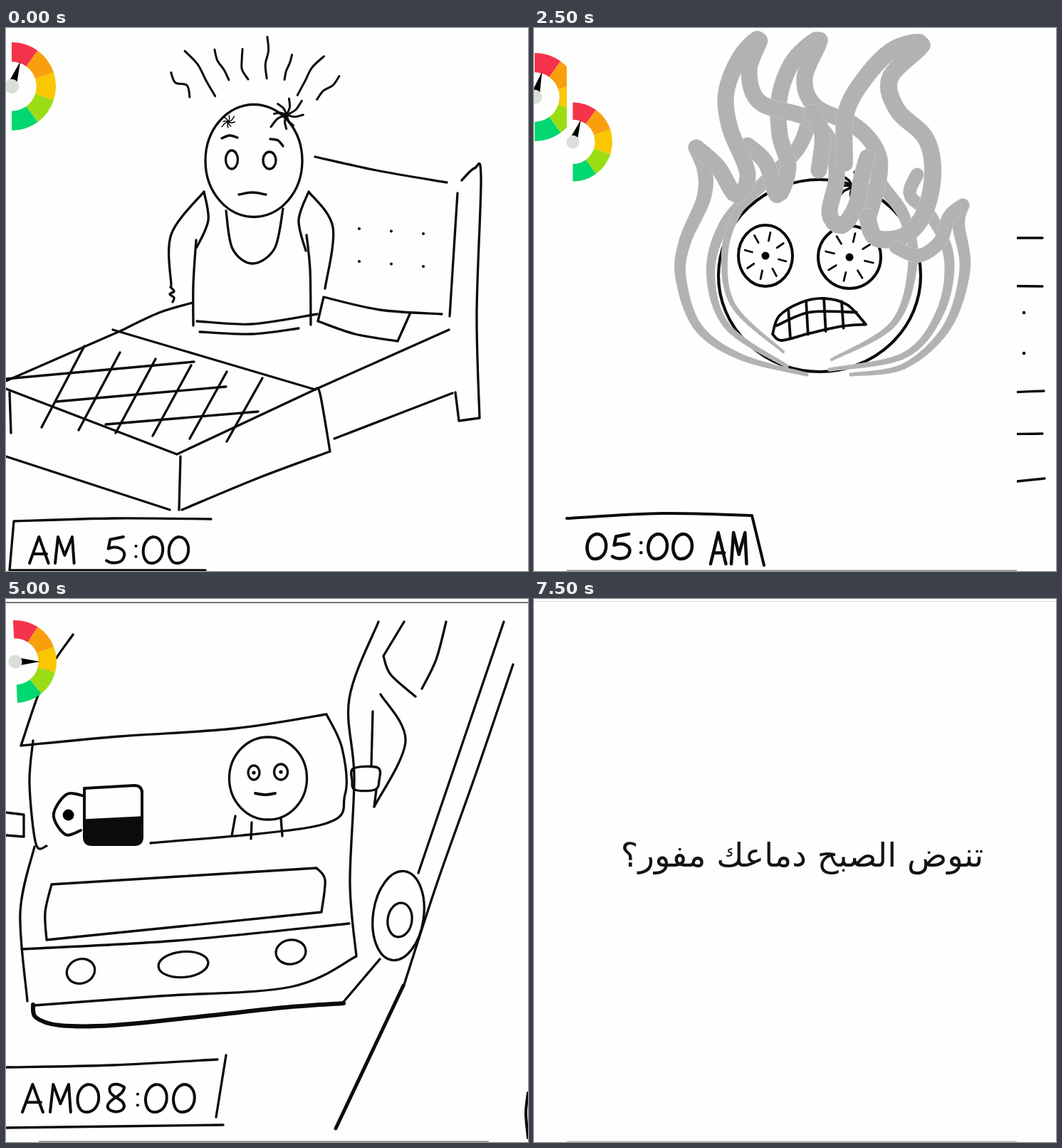
An HTML page that plays this animation: 733x763 px, repeating every 8 s.

```html
<!DOCTYPE html>
<html lang="ar">
<meta charset="utf-8">
<style>
html, body { margin: 0; height: 100%; overflow: hidden; background: #fdfefd; }
svg { display: block; }
.ink { fill: none; stroke: #0b0b0b; stroke-linecap: round; stroke-linejoin: round; }
text { font: 46.5px "DejaVu Sans", sans-serif; fill: #131318; direction: rtl; text-anchor: middle; }
</style>
<svg id="stage" width="733" height="763"></svg>
<script>
const BLACK = '#0b0b0b', PAPER = '#fdfefd';
const repeat = (n, draw) => Array.from({ length: n }, (_, i) => draw(i)).join('');
const random = seed => Math.abs(Math.sin(seed * 12.9898) * 43758.5453) % 1;
const polar = (x, y, rx, ry, degrees) => {
  const a = degrees * Math.PI / 180;
  return [x + rx * Math.cos(a), y + ry * Math.sin(a)];
};

// Smooth path through key points "x y x y ..."; equal ends make a closed loop
function curve(keys) {
  const n = keys.trim().split(/\s+/).map(Number);
  const p = n.filter((_, i) => i % 2 === 0).map((x, i) => [x, n[2 * i + 1]]);
  const last = p.length - 1;
  const closed = last > 1 && String(p[0]) === String(p[last]);
  const before = closed ? p[last - 1] : p[0], after = closed ? p[1] : p[last];
  return 'M' + p[0] + p.slice(1).map((end, i) => {
    const start = p[i], prev = p[i - 1] || before, next = p[i + 2] || after;
    const c1 = start.map((v, k) => v + (end[k] - prev[k]) / 6);
    const c2 = end.map((v, k) => v - (next[k] - start[k]) / 6);
    return `C${c1} ${c2} ${end}`;
  }).join('');
}
const line = (d, w = 3.3, color = BLACK) =>
  `<path class="ink" d="${d}" style="stroke:${color};stroke-width:${w}"/>`;
const ink = (strokes, w) => line(strokes.split('/').map(curve).join(''), w);
const solid = (d, color = BLACK) => `<path d="${d}" fill="${color}"/>`;
const dot = (x, y, r) => `<circle cx="${x}" cy="${y}" r="${r}"/>`;
const oval = (x, y, rx, ry, w = 3.3, turn = 0) =>
  `<ellipse class="ink" cx="${x}" cy="${y}" rx="${rx}" ry="${ry}" stroke-width="${w}" transform="rotate(${turn} ${x} ${y})"/>`;
const rule = (y, w, color, x0 = 0, x1 = 733) => solid(`M${x0} ${y - w / 2}H${x1}v${w}H${x0}z`, color);
const floorRule = rule(762.3, 1.4, '#8c8c8c', 46, 678);

// Half-dial mood meter: centre, radius, needle angle, tilt
const gauge = (x, y, r, needle, tilt = 0) =>
  `<g transform="translate(${x} ${y}) scale(${r / 100})">` +
  ['#f5334a', '#f99f0e', '#f9c700', '#9add14', '#00d771'].map((color, i) =>
    `<circle r="78" fill="none" stroke="${color}" stroke-width="44" pathLength="10" stroke-dasharray="1 9"
      transform="rotate(${tilt - 90 + 36 * i})"/>`).join('') +
  `<path d="M10-9 60 0 10 9z" transform="rotate(${needle})"/><circle r="16.5" fill="#dcdedb"/></g>`;

// Handwritten letters on a 10 x 10 grid
const glyphs = {
  A: 'M0 10L5 0 10 10M2 6.5H9', M: 'M0 10L1.5 0 5 7 9 0 10 10', P: 'M2 10L1 0C8-1 12 4 2 5.5',
  0: 'M5 0C-2 1-1.5 10 4 10C12 10 12 0 5 0', 1: 'M0 2.5L5 0 6 10',
  3: 'M1 1C6-1 11 2 8 4Q6 5 3 5C12 4 11 10 6 10Q3 10 1 9',
  5: 'M9 0L2 1 1 4.5C6 3 11 5 9 8 8 10 3 10.5 0 9',
  6: 'M10 0C3 0 0 4 0 7C0 11 7 10 9 8C10 5 6 4 2 7',
  8: 'M9 1C5-1 1 0 2 2.5C3 5 9 5 9 8C8 11 0 10 1 7.5C2 5 9 4 9 1',
  ':': 'M2 3.5h.1M2 7.5h.1', '–': 'M0 6H10', ' ': '',
};
const write = (text, x, y, step, h, pen = 4) => [...text].map(c => {
  const letter = `<path class="ink" d="${glyphs[c]}" vector-effect="non-scaling-stroke" stroke-width="${pen}"
    transform="translate(${x} ${y}) scale(${step * .074} ${h / 10})"/>`;
  x += ':–'.includes(c) ? step * .45 : step;
  return letter;
}).join('');

const eye = (x, y, rx, ry, pupil, w, veins = 0) =>
  oval(x, y, rx, ry, w) + dot(x, y, pupil) +
  repeat(veins, i => {
    const at = k => polar(x, y, rx * k, ry * k, 360 / veins * (i + .3));
    return line(`M${at(.5)}L${at(.78)}`, w * .7);
  });
const gridDots = (x, y, dx, slope, dy, r) =>
  repeat(6, i => dot(x + i % 3 * dx, y + i % 3 * slope + (i > 2 ? dy : 0), r));

// Wavy hairs rising from a head
const strands = (x, y, from, to, n, inner, outer, w) => repeat(n, i => {
  const a = from + (to - from) * i / (n - 1);
  const start = inner + 25 * random(i + 1), end = outer - 35 * random(i + 40);
  const keys = [0, 1, 2, 3].map(k => {
    const r = start + (end - start) * k / 3;
    return polar(x, y, r, r, a + 4 * (random(i * 4 + k) - .5)).join(' ');
  });
  return ink(keys.join(' '), w);
});
const burst = (x, y, r, rays, w) => repeat(rays, i => {
  const a = 360 / rays * (i + .3 * random(i)), reach = r * (.7 + .5 * random(i + 9));
  return ink([[x, y], polar(x, y, reach / 2, reach / 2, a + 14), polar(x, y, reach, reach, a)].join(' ').replaceAll(',', ' '), w);
});

// Bared teeth in a w x h box
function teeth(x, y, w, h, pen) {
  const at = (u, v) => `${x + u * w} ${y + v * h} `;
  return ink(at(0, .85) + at(.07, .42) + at(.3, .1) + at(.55, 0) + at(.8, .15) + at(1, .62) + '/' +
    at(1, .62) + at(.75, .66) + at(.4, .83) + at(.1, 1) + at(0, .85) + '/' +
    at(.04, .65) + at(.4, .33) + at(.9, .33), pen) +
    repeat(4, i => {
      const u = .17 + .19 * i;
      return ink(at(u, 1.9 * (u - .55) ** 2) + at(u + .02, 1 - .4 * u), pen);
    });
}

// Cup with a round handle; level is the empty share, null shows it from above
function mug(x, y, w, h, level, pen) {
  const r = h * .13;
  const base = `V${y + h - r}Q${x + w} ${y + h} ${x + w - r} ${y + h}H${x + r}Q${x} ${y + h} ${x} ${y + h - r}`;
  const handle = [[0, .18], [-.3, .15], [-.52, .5], [-.32, .83], [-.06, .76]]
    .map(([u, v]) => `${x + u * h} ${y + v * h}`).join(' ');
  const inside = level === null
    ? oval(x + w / 2, y, w / 2, 10, pen, -2) + ink(`${x + 25} ${y + 3} ${x + 90} ${y}`, 13)
    : line(`M${x} ${y + 4}L${x + w - r} ${y}Q${x + w} ${y} ${x + w} ${y + r}`, pen) +
      solid(`M${x} ${y + h * level + 4}L${x + w} ${y + h * level}${base}z`);
  return ink(handle, pen) + dot(x - h * .27, y + h * .5, h * .095) +
    line(`M${x + w} ${y + 8}${base}V${y + 4}`, pen) + inside;
}

// Grey stroke with a pale edge whose width runs from w0 to w1
function brush(keys, w0, w1 = w0) {
  const probe = document.createElementNS('http://www.w3.org/2000/svg', 'path');
  probe.setAttribute('d', curve(keys));
  const length = probe.getTotalLength(), n = Math.ceil(length / 7);
  const at = i => { const p = probe.getPointAtLength(length * i / n); return `${p.x} ${p.y}`; };
  const layer = (extra, color) => repeat(n, i =>
    line(`M${at(i)}L${at(i + 1)}`, w0 + (w1 - w0) * i / n + extra, color));
  return layer(1.2, '#c6c8c6') + layer(0, '#b1b3b1');
}

const wakingUp =
  gauge(8, 82, 62, -71) +
  oval(348, 186.5, 68, 79) + oval(317, 185, 8.5, 13) + oval(370, 186, 9, 12) +
  ink('303 155 314 151 325 154 / 371 156 382 158 389 166 / 327 234 346 231 365 234') +
  ink('309 257 318 310 346 331 377 310 389 254') +
  ink('232 362 232 290 278 230 / 278 230 284 270 268 308 / 267 298 263 360 263 418 / 231 364 236 370 230 374 236 379 234 385') +
  ink('448 366 459 280 425 230 / 425 230 411 270 421 313 / 422 291 427 340 428 417') +
  ink('268 412 345 416 437 402 / 272 427 345 430 411 422') +
  ink('262 386 215 400 160 426 / 160 426 0 496 / 150 424 434 508 / 434 508 622 424') +
  ink('446 378 438 412 / 438 412 490 430 550 440 / 550 440 567 402 / 446 378 525 396 612 402') +
  ink('434 181 520 200 619 217 / 640 214 658 197 667 210 661 400 665 548 / 665 548 636 552 / 636 552 631 512 / 634 232 623 405 / 627 513 461 577') +
  ink('434 508 441 514 455 595 / 455 595 355 632 247 677 / 230 677 0 602 / 0 507 240 599 / 240 599 434 508 / 245 602 243 677 / 5 512 7 569') +
  repeat(6, i => ink(`${110 + 50 * i} ${447 + 9 * i} ${50 + 52 * i} ${561 + 4 * i}`)) +
  repeat(3, i => ink(`${70 * i} ${493 + 32 * i} ${264 + 45 * i} ${469 + 35 * i}`)) +
  gridDots(496, 282, 45, 3.5, 46, 2) +
  strands(350, 186, -134, -46, 8, 105, 185, 3) +
  burst(394, 122, 25, 8, 3) + burst(312, 132, 10, 8, 1.5) +
  ink('288 690 150 689 11 693 / 11 693 5 762 / 5 762 280 762') +
  write('AM 5:00', 33, 715, 36, 37);

const tense =
  gauge(1, 97, 62, -74) +
  oval(314, 246, 88, 104) + eye(278, 242, 16, 26.5, 4.5, 3, 7) + eye(342, 237, 16, 30, 4.5, 3, 7) +
  teeth(285, 288, 69, 32, 2) +
  ink('276 340 275 420 315 470 360 425 365 334') +
  ink('273 380 240 402 198 410 188 470 194 555 210 577 / 254 396 251 460 234 504 / 228 462 225 604') +
  ink('369 378 395 389 437 390 460 410 461 535 443 548 429 525 417 452 / 391 390 396 465 420 499 / 420 480 421 540 418 592') +
  ink('118 677 212 603 / 212 603 390 591 560 574 714 570 / 240 677 480 657 717 633') +
  ink('455 400 461 372 464 275 482 236 498 275 507 402') +
  ink('516 295 714 295 / 714 363 516 361 / 516 361 514 450 519 521 / 519 521 600 515 716 510') +
  gridDots(564, 399, 62, .5, 57, 2.3) +
  strands(314, 246, -150, -42, 22, 145, 248, 2.6) +
  burst(353, 167, 40, 7, 3.6);

const burning = tense +
  solid('M46 0H678V763H46z', PAPER) +
  gauge(54.5, 160, 55.5, -70) +
  oval(401, 348, 142, 135, 4.2) + eye(325, 320, 38, 43, 5.5, 4, 8) + eye(443, 322, 44, 44, 5.5, 4, 8) +
  teeth(335, 380, 131, 59, 3.8) + burst(447, 224, 24, 8, 3.5) +
  brush('228 168 240 200 238 240 212 300 206 350 230 420 290 462 383 487', 22, 4) +
  brush('390 118 370 170 320 220 268 275 248 345 272 420 355 475', 22, 4) +
  brush('325 215 288 255 268 315 280 390 350 455', 12, 3) +
  brush('538 206 528 235 558 265 583 325 570 400 520 460 415 480', 18, 4) +
  brush('602 249 596 275 605 340 580 420 520 475 445 487', 18, 4) +
  brush('468 182 488 220 520 265 532 330 505 415 418 466', 20, 3) +
  brush('300 165 326 190 342 235 357 195 345 150 345 95 365 45 401 16 380 70 395 110 450 137 480 170 485 205 470 265', 22) +
  brush('228 168 258 195 284 235 300 205 275 140 270 90 290 40 317 15 302 60 318 105 385 127 418 165 425 210 415 260 432 278 452 250 460 210 468 182', 22) +
  brush('390 118 405 150 400 200', 22) +
  brush('436 190 438 120 465 70 505 30 545 23 500 70 510 115 550 155 560 205 548 260 520 292 480 295 468 265', 23) +
  brush('602 249 583 265 570 300 540 320 508 308', 18) +
  ink('46 689 180 682 306 685 / 306 685 323 755', 4) +
  write('05:00', 75, 711, 35, 35, 4.5) + write('AM', 248, 709, 29, 44, 4.5) + floorRule;

const coffee =
  rule(8, 3.6, BLACK, 0, 278) + rule(13, 2.4, '#777') +
  gauge(10, 100, 79, -37, -1.5) +
  ink('455 104 545 140 573 214 535 315 448 356 370 310 347 235 375 140 455 104', 5) +
  eye(414, 205, 18, 31, 4, 5) + eye(500, 202, 20.5, 31.5, 4, 5) + ink('418 288 477 287', 6) +
  ink('195 341 192 370 200 394 / 238 310 227 335 232 375 219 397 / 268 323 267 355 274 380 265 393', 9) +
  mug(184, 437, 117, 93, null, 5) +
  ink('0 631 120 622 241 619 / 241 619 249 735 / 0 753 125 750 252 743', 5) +
  write('06:00', 19, 659, 48, 48, 5) + floorRule;

const driving =
  rule(5, 2, '#777') +
  ink('94 50 55 110 21 206 / 21 206 160 193 320 182 450 162 / 450 162 472 210 476 275 440 318 203 343 / 38 199 33 260 42 344 57 347') +
  gauge(13, 88, 58, 0, -3) +
  ink('523 32 482 140 489 250 483 400 492 502 / 492 502 400 545 215 558 40 571 / 40 348 20 440 30 565 / 474 566 525 506') +
  ink('38 570 42 588 75 599 150 599 280 586 390 574 474 568', 6) +
  ink('64 401 436 378 / 436 378 448 395 443 440 / 443 440 57 479 / 57 479 55 440 64 401 / 22 492 240 480 482 456') +
  oval(105, 523, 20, 17, 3.3, -20) + oval(249, 513.5, 35, 18, 3.3, -5) + oval(400, 496, 21, 17, 3.3, -8) +
  oval(551, 445, 35.5, 63, 3.3, 8) + oval(553, 451, 17, 24, 3.3, 8) +
  ink('488 238 522 237 524 255 518 268 490 268 486 255 488 238 / 0 300 25 303 / 25 303 25 334 / 25 334 0 332') +
  ink('559 32 530 80 / 530 80 540 106 575 137 / 618 32 604 85 584 126 / 526 134 561 200 517 292 / 517 292 520 268 / 515 158 513 234') +
  ink('699 32 579 385 / 712 92 660 245 605 400 558 545') + ink('558 543 463 744', 5) +
  oval(368, 252, 54.5, 58) + eye(348, 244, 8, 10, 2.6, 3.3) + eye(386, 243, 9.5, 11, 2.6, 3.3) +
  ink('350 273 364 275 378 273', 4) + ink('322 305 317 333 / 345 314 344 337 / 386 308 388 333') +
  mug(110, 262, 81, 83, .52, 4) +
  ink('0 658 150 655 297 647 / 309 641 295 728 / 0 743 305 739') + ink('733 694 730 722 733 757', 4) +
  write('AM08:00', 23, 682, 39, 39) + floorRule;

const happy =
  rule(4.5, 1.6, '#777') + gauge(4, 97, 86, 67.5, -4) +
  ink('450 239 508 262 527 315 500 390 432 425 385 395 368 325 390 262 450 239', 3.6) +
  eye(409, 320, 15.5, 23, 3.8, 3.6) + eye(468, 322, 13.5, 20.5, 3.8, 3.6) +
  ink('401 283 413 280 426 282 / 459 288 475 286 491 290') +
  ink('406 377 440 383 473 368 / 473 368 434 402 406 377', 5.5) +
  ink('400 416 399 439 / 453 424 455 439 / 399 436 340 455 308 490 302 607 / 455 434 520 460 550 532 / 340 607 345 545 355 515 / 355 515 365 607 / 502 507 505 590') +
  ink('553 530 553 605 / 506 543 512 575 512 620', 5.5) +
  mug(220, 438, 59, 60, .77, 3.8) +
  ink('0 667 165 652 357 640 / 0 749 160 747 300 744 365 747 410 741', 6) +
  write('AM03:00', 22, 693, 37, 36) + write('– 01:00PM', 278, 697, 28, 34) + floorRule;

const question =
  rule(3.5, 1.2, '#ddd') + rule(762.3, 1.2, '#b5b5b5', 46, 678) +
  '<text x="376.5" y="376">تنوض الصبح دماعك مفور؟</text>';

const scenes = [wakingUp, tense, burning, coffee, driving, happy, question];
const stage = document.getElementById('stage');
let shown = -1;
function tick() {
  const index = Math.floor(performance.now() % 8000 / 1250);
  if (index !== shown) stage.innerHTML = scenes[shown = index];
  requestAnimationFrame(tick);
}
tick();
</script>
</html>
```
